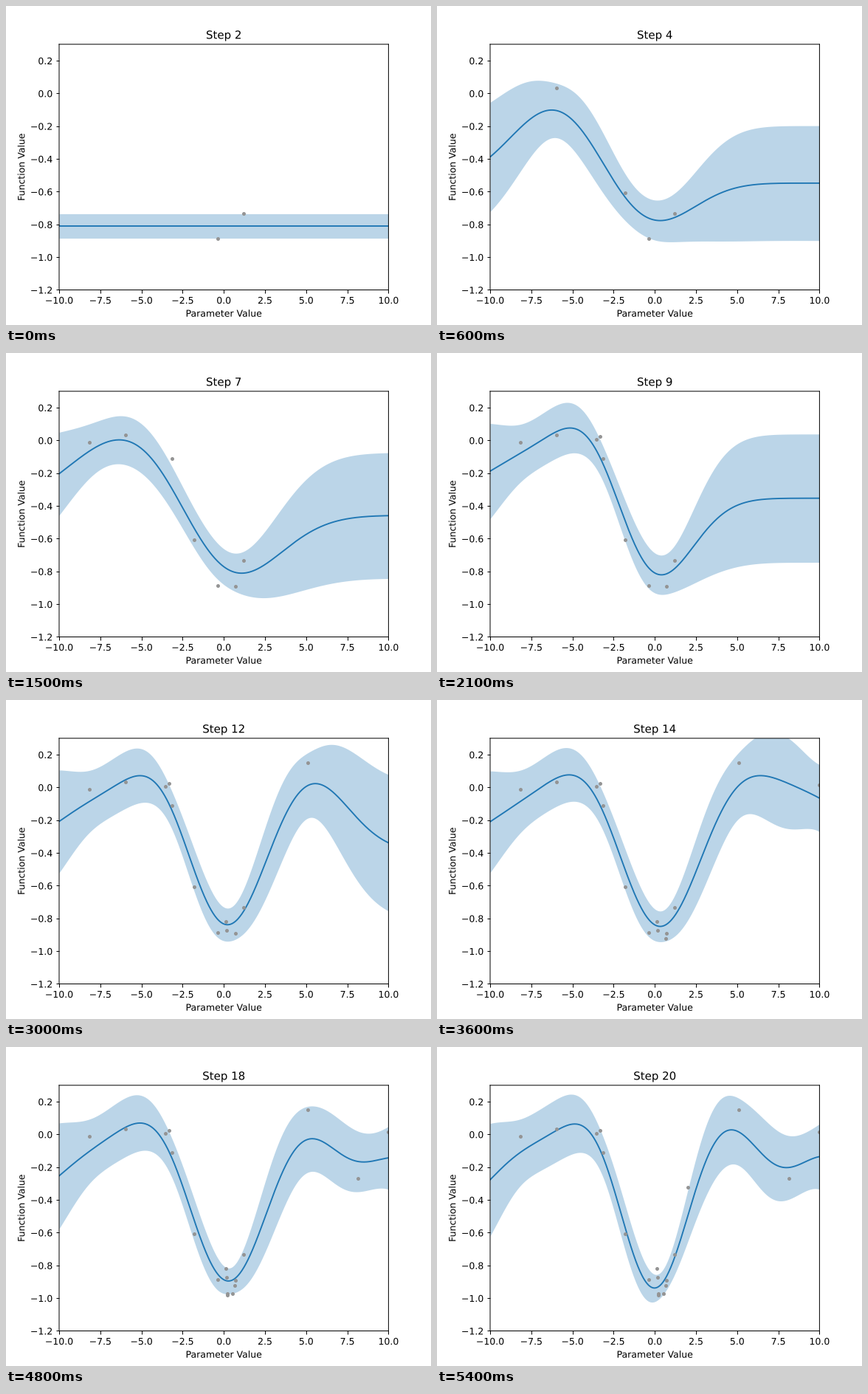
Animation of 576x432 px, one loop 5.7 s. Source, as a matplotlib script:

```python
import numpy as np
import matplotlib.pyplot as plt
from matplotlib.animation import FuncAnimation
from matplotlib.patheffects import Normal

# Outline text and unsnapped lines give smooth sub-pixel placement
plt.rcParams.update({
    "font.family": "DejaVu Sans",
    "text.hinting": "no_hinting",
    "path.snap": False,
    "path.effects": [Normal()],
})

NOISE = 0.3
FIRST = 2
BLUE = "#1f77b4"

# Where the function is probed, in order, and the error of each reading
probes = np.array([
    (-0.385, 0.091), (1.21, 0.038), (-5.99, -0.013), (-1.8, -0.067),
    (0.695, 0.029), (-8.15, 0.105), (-3.13, -0.106), (-3.54, -0.105),
    (-3.325, -0.03), (0.125, 0.177), (0.185, 0.12), (5.11, -0.03),
    (0.665, 0.006), (10, -0.041), (0.215, 0.022), (0.52, -0.017),
    (0.22, 0.011), (8.145, -0.15), (1.985, 0.136), (0.1, -0.222),
])
xs = probes[:, 0]
ys = -np.sinc(xs / np.pi) + probes[:, 1]
grid = np.linspace(-10, 10, 500)
scales = np.geomspace(1e-5, 20, 600)


def rbf(a, b, scale):
    return np.exp(-0.5 * ((a[:, None] - b[None, :]) / scale) ** 2)


def best_scale(x, z):
    """Length scale with the highest marginal likelihood."""
    cov = rbf(x, x, scales[:, None, None]) + NOISE * np.eye(len(x))
    weights = np.linalg.solve(cov, z[:, None])[..., 0]
    loss = weights @ z + np.linalg.slogdet(cov)[1]
    return scales[np.argmin(loss)]


def posterior(x, y):
    """Mean and standard deviation of the fitted process on the grid."""
    mid, spread = y.mean(), y.std()
    z = (y - mid) / spread
    scale = best_scale(x, z)
    cov = rbf(x, x, scale) + NOISE * np.eye(len(x))
    cross = rbf(grid, x, scale)
    mean = cross @ np.linalg.solve(cov, z)
    var = 1 - np.sum(cross * np.linalg.solve(cov, cross.T).T, axis=1)
    return mid + spread * mean, spread * np.sqrt(np.maximum(var, 0))


fits = [posterior(xs[:n], ys[:n]) for n in range(FIRST, len(xs) + 1)]

fig, ax = plt.subplots(figsize=(6.4, 4.8), dpi=90)


def draw(i):
    step = i + FIRST
    mean, std = fits[i]
    ax.clear()
    ax.fill_between(grid, mean - std, mean + std, color=BLUE, alpha=0.3,
                    linewidth=0)
    ax.plot(grid, mean, color=BLUE, linewidth=1.5)
    ax.scatter(xs[:step], ys[:step], s=16, color="#949494", linewidths=0,
               zorder=2.2)
    ax.set_xlim(-10, 10)
    ax.set_ylim(-1.2, 0.3)
    ax.set_xticks(np.arange(-10, 10.1, 2.5))
    ax.set_yticks(np.arange(-6, 2) * 0.2)
    ax.set_xlabel("Parameter Value")
    ax.set_ylabel("Function Value")
    ax.set_title(f"Step {step}")


anim = FuncAnimation(fig, draw, frames=len(fits), interval=300,
                     init_func=lambda: None, repeat=True)
plt.show()
```
